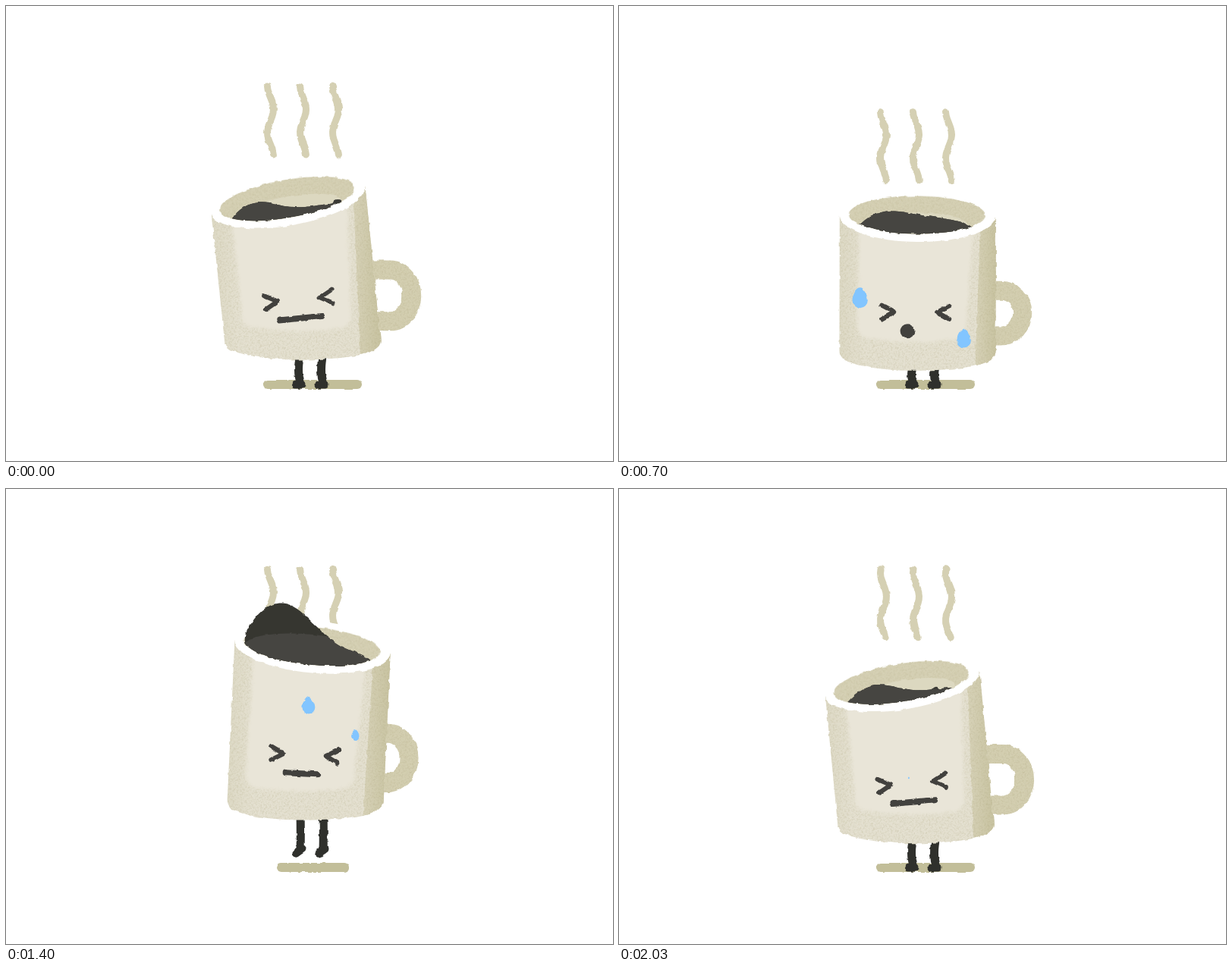
An HTML page for the animation above (2.1 s loop, 800 px wide and 600 px high).

```html
<!DOCTYPE html>
<html>
<head>
<meta charset="utf-8">
<title>Jumping mug</title>
<style>
html, body { margin: 0; width: 100%; height: 100%; overflow: hidden; background: #fff; }
svg { display: block; width: 800px; height: 600px; }
.line { fill: none; stroke-linecap: round; stroke-linejoin: round; }
</style>
</head>
<body>
<svg viewBox="0 0 800 600">
  <defs>
    <filter id="rough" filterUnits="userSpaceOnUse" x="0" y="0" width="800" height="600" color-interpolation-filters="sRGB">
      <feTurbulence type="fractalNoise" baseFrequency=".11" numOctaves="2" seed="4"/>
      <feColorMatrix values="1 0 0 0 0  0 1 0 0 0  0 0 1 0 0  0 0 0 0 1" result="noise"/>
      <feDisplacementMap in="SourceGraphic" in2="noise" scale="4" xChannelSelector="R" yChannelSelector="G"/>
    </filter>
    <filter id="grain" x="-30%" y="-30%" width="160%" height="160%" color-interpolation-filters="sRGB">
      <feTurbulence type="fractalNoise" baseFrequency=".45" numOctaves="2" seed="9"/>
      <feColorMatrix values="0 0 0 0 .66  0 0 0 0 .63  0 0 0 0 .47  .6 0 0 0 -.26"/>
      <feComposite in2="SourceGraphic" operator="in" result="dots"/>
      <feMerge><feMergeNode in="SourceGraphic"/><feMergeNode in="dots"/></feMerge>
    </filter>
    <filter id="soft"><feGaussianBlur stdDeviation="2"/></filter>
    <linearGradient id="bodyTone">
      <stop offset="0" stop-color="#ddd9c5"/><stop offset=".16" stop-color="#e4e0d0"/>
    </linearGradient>
    <linearGradient id="sideTone">
      <stop offset="0" stop-color="#d7d2b8"/><stop offset="1" stop-color="#c8c3a1"/>
    </linearGradient>
    <clipPath id="cupClip"><path d="M-90 -1V-130H88V-1A89 25 0 0 1 -90 -1"/></clipPath>
    <clipPath id="innerClip"><ellipse cx="-1" cy="5" rx="87" ry="21"/></clipPath>
    <clipPath id="wallClip"><ellipse cx="-1" cy="-1" rx="90" ry="25"/></clipPath>
  </defs>
  <g filter="url(#rough)">
    <path id="shadow" class="line" stroke="#c2be99" stroke-width="12"/>
    <path id="steam" class="line" stroke="#d5d0b3" stroke-width="9"/>
    <path id="legs" class="line" stroke="#2f302c" stroke-width="11"/>
    <path id="handle" fill="none" stroke="#d3ceb0" stroke-width="25" filter="url(#grain)"/>
    <path id="body" fill="url(#bodyTone)" filter="url(#grain)"/>
    <path id="front" fill="#e9e5d8" filter="url(#soft)"/>
    <path id="side" fill="url(#sideTone)" filter="url(#grain)"/>
    <g id="rim">
      <ellipse rx="103" ry="34.5" fill="#fff"/>
      <ellipse cx="-1" cy="-1" rx="90" ry="25" fill="#d5d0b4" filter="url(#grain)"/>
      <ellipse cy="14" rx="68" ry="18" fill="#dcd8c0" clip-path="url(#wallClip)"/>
      <g clip-path="url(#cupClip)">
        <path id="coffee" fill="#363630"/>
        <circle id="bump" fill="#3a3a35"/>
        <path id="surface" fill="#464541" clip-path="url(#innerClip)"/>
      </g>
    </g>
    <circle id="splashA" r="9.5" fill="#2f302c"/>
    <circle id="splashB" r="14.5" fill="#2f302c"/>
    <g id="face">
      <path id="shut" class="line" stroke="#42413e" stroke-width="6"
        d="M-45 -9L-28 0L-44 9M45 -9L28 0L44 9"/>
      <g id="open"></g>
      <path id="mouth" class="line" stroke="#42413e"/>
    </g>
    <path id="sweat" fill="#82c5ff"/>
  </g>
</svg>
<script>
const LOOP = 2100, STEP = 70, BEAT = LOOP / 3, TURN = 2 * Math.PI;
const el = {};
document.querySelectorAll('svg [id]').forEach(e => el[e.id] = e);
const set = (id, name, value) => el[id].setAttribute(name, value);
const show = (id, on) => set(id, 'visibility', on ? 'visible' : 'hidden');
const bell = (t, mid, width) => Math.exp(-(((t - mid) / width) ** 2));

el.open.innerHTML = [-38, 38].map(x => `<circle cx="${x}" r="18" fill="#fff"/>
  <circle cx="${x}" cy="1" r="13" fill="#383834"/>
  <circle cx="${x - 8}" cy="-7" r="6.5" fill="#fff"/>
  <circle cx="${x + 8}" cy="10" r="3.5" fill="#fff"/>`).join('');

// eased loop through [time, value] points
function ease(t, ...points) {
  points.push([LOOP, points[0][1]]);
  const i = points.findIndex(p => p[0] > t);
  const [t0, a] = points[i - 1], [t1, b] = points[i];
  return a + (b - a) * (1 - Math.cos(Math.PI * (t - t0) / (t1 - t0))) / 2;
}

const tilt = t => ease(t, [0, -10], [420, 5], [1110, -8], [1450, 6], [1600, 6]);
const baseY = t => ease(t, [0, 466], [900, 482], [1400, 436], [1680, 476]);
const tallness = t => ease(t, [0, 211], [420, 213], [1020, 192], [1400, 228], [1750, 206]);
const steamTop = t => ease(t, [0, 106], [1030, 150], [1530, 98], [1810, 127], [2060, 105]);
const mouthHalf = t => ease(t, [0, 28], [350, 12], [1300, 20], [1800, 28]);

// sweat: heights are shares of the mug's height
const drops = [
  { from: 140, to: 1000, x: 61, high: .4, low: .1, size: 10.5 },
  { from: 300, to: 1260, x: -76, high: .65, low: .21, size: 10.5 },
  { from: 700, to: 1540, x: 61, high: .74, low: .44, size: 10.5 },
  { from: 1090, to: 2060, x: -2, high: .785, low: .395, size: 10 }
];
function dropPath(t, bx, by, lean, tall) {
  return drops.map(({ from, to, x, high, low, size }) => {
    const p = (t - from) / (to - from);
    if (p <= 0 || p >= 1) return '';
    const r = size * Math.sin(Math.PI * p), h = high + (low - high) * p;
    return `M${bx + x + lean * h} ${by - tall * h - 1.4 * r}c${.5 * r} ${.2 * r} ${r} ${r} ${r} ${1.7 * r}` +
      `a${r} ${r} 0 0 1 ${-2 * r} 0c0 ${-.7 * r} ${.5 * r} ${-1.5 * r} ${r} ${-1.7 * r}`;
  }).join('');
}

function steamPath(t, top) {
  let d = '';
  for (let i = 0; i < 3; i++)
    for (let u = 0; u <= 90; u += 5) {
      const x = 348.5 + 43 * i + 4 * Math.cos(TURN * ((u - 30) / 62 + t / BEAT));
      d += `${u ? 'L' : 'M'}${x} ${top + u}`;
    }
  return d;
}

// a hump sways once per beat, and bursts upwards during the jump
function drawCoffee(t) {
  const burst = bell(t, 1430, 190), calm = bell(t, 650, 300);
  const mid = -45 * Math.cos(TURN * t / BEAT);
  const size = 18 + 42 * burst - 8 * calm, width = 40 + 22 * burst;
  const level = x => 15 - 10 * burst - size * bell(x, mid, width)
    - 14 * calm * (1 - (x / 85) ** 2) + 25 * (x / 92) ** 8;
  let d = 'M-95 60';
  for (let x = -95; x <= 95; x += 5) d += `L${x} ${level(x)}`;
  d += 'L95 60Z';
  set('coffee', 'd', d);
  set('surface', 'd', d);
  const age = (t + 140) % LOOP, x = Math.min(63, 21 + .3 * age);
  set('bump', 'cx', x);
  set('bump', 'cy', level(x) + 2);
  set('bump', 'r', Math.min(8, 3 + age / 35));
  show('bump', age < 600);
}

// free fall, with the place given at 1820 ms
function splash(id, t, x, y, speed, apex, rimY) {
  const fall = time => .00235 * (time - apex) ** 2;
  const now = y + fall(t) - fall(1820);
  set(id, 'cx', x + speed * (t - 1820));
  set(id, 'cy', now);
  show(id, t >= 1470 && t < 2000 && now < rimY - 8);
}

function drawFace(t, x, y, angle) {
  const open = t >= 210 && t < 700, round = t >= 700 && t < 1225;
  const half = round ? 0 : mouthHalf(t);
  const mx = round ? -11 : (half - 28) * .43;
  set('face', 'transform', `translate(${x} ${y}) rotate(${angle})`);
  show('shut', !open);
  show('open', open);
  set('mouth', 'd', `M${mx - half} 25h${2 * half + .01}`);
  set('mouth', 'stroke-width', round ? 24 - t / 140 : 8);
}

function draw(t) {
  const angle = tilt(t), by = baseY(t), tall = tallness(t);
  const cx = 393 + 2.1 * angle, cy = by - tall;
  const bx = 393 + (cx - 390) * .12, l = bx - 103, r = bx + 103;
  const lift = Math.max(0, 19 * (1 - ((t - 1370) / 320) ** 2));
  const rad = angle * Math.PI / 180, dx = 103 * Math.cos(rad), dy = 103 * Math.sin(rad);
  const tl = [cx - dx, cy - dy], tr = [cx + dx, cy + dy];
  const sideX = tr[0] - 20 - angle * .4;

  const spread = 59 - lift * .9, foot = 499 - lift;
  set('shadow', 'd', `M${404 - spread} 499H${404 + spread}`);
  set('steam', 'd', steamPath(t, steamTop(t)));
  set('legs', 'd', [386, 416].map(x =>
    `M${x + 2} ${by - 8}Q${x - 3 + lift * .3} ${(by + foot) / 2} ${x + 2} ${foot - 4}` +
    `M${x - 4} ${foot}L${x + 4} ${foot - lift * .3}`).join(''));

  const drop = .37 * tall - .6 * angle, ry = .45 * drop - 3.9;
  const hx = bx + 151.5 + 4.5 * Math.cos(TURN * (t - 80) / LOOP);
  set('handle', 'd', `M${bx + 82} ${by - drop - ry}H${hx - 40}a28 ${ry} 0 0 1 0 ${2 * ry}H${bx + 82}`);

  const corner = `L${r - 27} ${by - 6}Q${r - 1} ${by - 12} ${r} ${by - 24}L${tr}Z`;
  set('body', 'd', `M${tl}L${l} ${by - 26}Q${l} ${by - 14} ${l + 12} ${by - 11}` +
    `C${l + 50} ${by + 4} ${r - 70} ${by + 3} ${r - 27} ${by - 6}${corner}`);
  set('side', 'd', `M${sideX} ${tr[1]}${corner}`);
  set('front', 'd', `M${tl[0] + 26} ${tl[1]}L${l + 24} ${by - 56}q1 12 14 14Q${bx} ${by - 33} ${r - 54} ${by - 41}` +
    `q14 -2 15 -14L${sideX - 9} ${tr[1]}Z`);

  set('rim', 'transform', `translate(${cx} ${cy}) rotate(${angle})`);
  drawCoffee(t);
  splash('splashA', t, 406, 176, .09, 1640, cy);
  splash('splashB', t, 441, 221, .14, 1618, cy);
  drawFace(t, 391 + (cx - 393) * .25, by - .375 * tall, angle * .55);
  set('sweat', 'd', dropPath(t, bx, by, cx - bx, tall));
}

function tick() {
  draw(Math.floor(performance.now() % LOOP / STEP) * STEP);
  requestAnimationFrame(tick);
}
tick();
</script>
</body>
</html>
```
